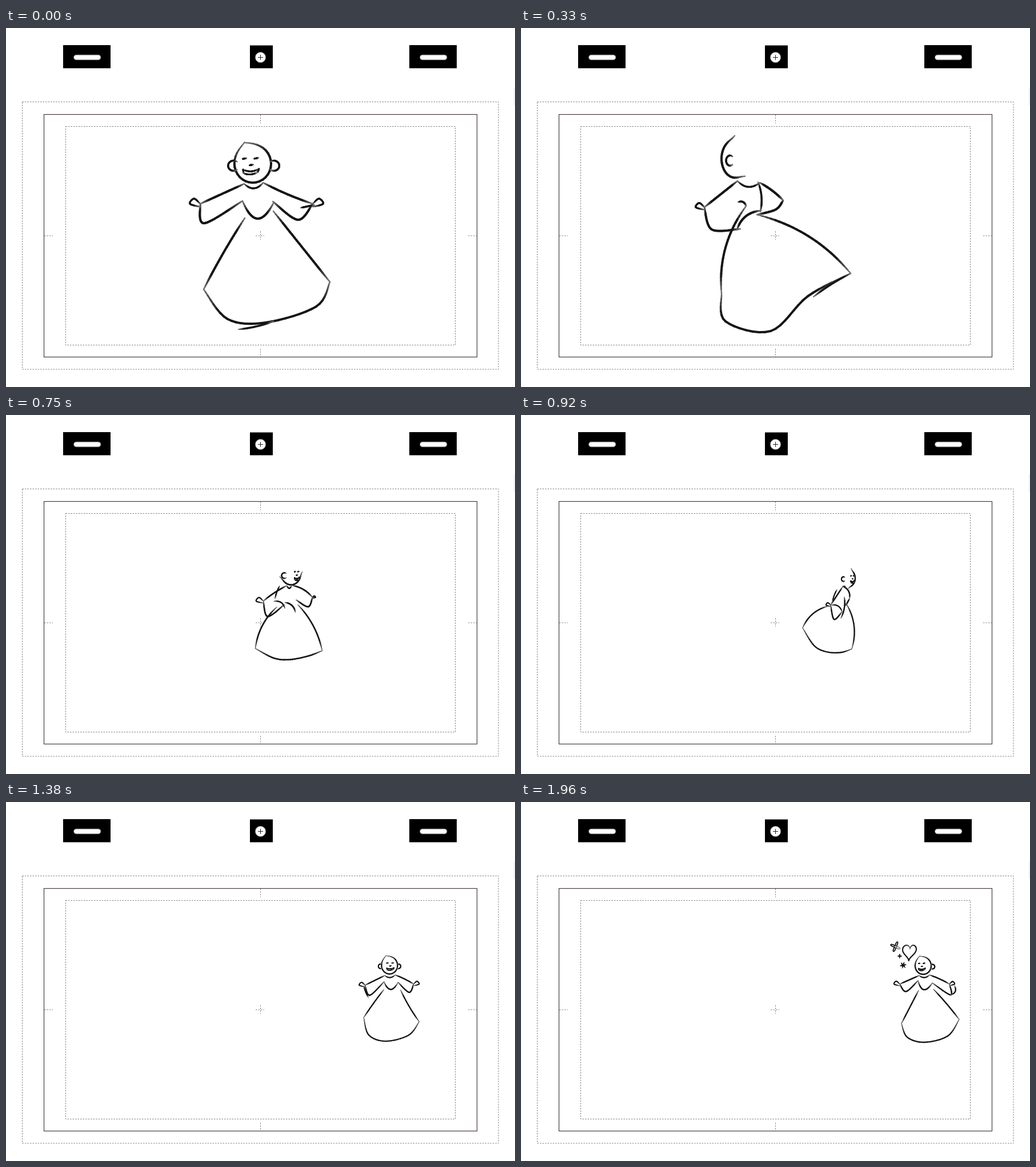
An HTML page with a canvas that plays this animation: 891x629 px, repeating every 2120 ms.

```html
<!DOCTYPE html>
<html lang="en">
<head>
<meta charset="utf-8">
<title>Twirl</title>
<style>
html, body { margin: 0; width: 100%; height: 100%; overflow: hidden; background: #fff; }
canvas { display: block; width: 891px; height: 629px; }
</style>
</head>
<body>
<canvas id="stage" width="891" height="629"></canvas>
<script>
const ctx = document.getElementById('stage').getContext('2d');
const LOOP = 2120, BEAT = 1000 / 12, RESTART = 1460, LAST = 1960;
const TAU = Math.PI * 2;

// One half of the body: joints, arm and skirt bend, hand length
const half = (shoulder, wrist, drop, under, hip, arm, skirt, hand) =>
  ({ shoulder, wrist, drop, under, hip, arm, skirt, hand });

// head: centre and radii; arc: visible outline in degrees; bust and lines: ends and bend
const POSES = [
  {
    t: 0, w: 4, head: [432, 238, 32, 33], arc: [-112, -472],
    left: half([417, 273], [340, 308], [347, 342], [414, 303], [418, 333], 0, 2, 18),
    right: half([450, 271], [537, 308], [511, 336], [467, 304], [468, 321], 2, 0, 18),
    bust: [414, 303, 469, 305, 30],
    hem: [[346, 458], [388, 510], [455, 516], [543, 488], [567, 445]],
    look: { ears: [1.15, -1.05], face: -0.12, lines: [[516, 315, 540, 310, 0], [407, 528, 468, 514, 2]] }
  },
  {
    t: 330, w: 4, head: [374, 229, 23, 33], arc: [-90, -310],
    left: half([379, 268], [321, 314], [334, 353], [384, 352], [394, 312], 0, 15, 15),
    right: half([418, 271], [459, 302], [446, 318], [414, 327], [413, 327], -2, -16, 0),
    bust: [378, 354, 420, 320, -9],
    hem: [[351, 465], [358, 514], [437, 531], [502, 470], [577, 430]],
    look: { ears: [-0.35], face: null, lines: [[415, 270, 419, 322, -4], [577, 430, 512, 471, 2], [380, 305, 394, 312, -4]] }
  },
  {
    t: 580, w: 2.8, head: [425, 273, 21, 21], arc: [-110, -315],
    left: half([420, 297], [359, 319], [368, 348], [413, 319], [411, 338], 3, 8, 17),
    right: half([437, 297], [498, 317], [488, 341], [448, 315], [453, 335], -3, -4, 10),
    bust: [411, 338, 453, 335, -6],
    hem: [[380, 445], [425, 448], [460, 442], [500, 428], [528, 416]],
    look: { ears: [1.05], face: null, lines: [[378, 445, 529, 417, -31], [413, 318, 414, 338, 3], [448, 315, 443, 336, -3], [350, 325, 366, 348, 0]] }
  },
  {
    t: 920, w: 2.3, head: [573, 286, 12, 15], arc: [-270, -430],
    left: half([563, 301], [542, 333], [548, 358], [562, 345], [537, 335], 0, 7, 8),
    right: half([563, 300], [575, 322], [570, 331], [568, 333], [569, 330], -5, -9, 0),
    bust: [566, 319, 560, 356, -3],
    hem: [[493, 373], [513, 404], [535, 415], [560, 416], [579, 410]],
    look: { ears: [-0.7], face: 0.6, lines: [[562, 345, 543, 333, 5], [553, 306, 545, 328, 1]] }
  },
  {
    t: 1170, w: 2.2, head: [654, 286, 14, 15], arc: [-112, -472],
    left: half([645, 304], [610, 322], [617, 342], [644, 316], [643, 328], 0, 1, 10),
    right: half([663, 303], [694, 319], [681, 331], [668, 315], [674, 330], -1, 3, 10),
    bust: [644, 316, 668, 316, 12],
    hem: [[605, 372], [613, 406], [642, 418], [682, 408], [700, 387]],
    look: { ears: [1.1, -1.1], face: 0.08, lines: [[609, 322, 617, 342, 1]] }
  },
  {
    t: 1630, w: 2.3, head: [704, 287, 14, 15], arc: [-112, -472],
    left: half([697, 304], [663, 319], [674, 332], [695, 313], [696, 330], 0, 0, 10),
    right: half([715, 303], [750, 319], [752, 338], [720, 317], [722, 328], -1, -1, 9),
    bust: [695, 313, 720, 317, 14],
    hem: [[666, 388], [676, 412], [706, 421], [747, 410], [767, 381]],
    look: { ears: [1.15], face: -0.18, lines: [[759, 322, 752, 338, -5]] }
  }
];

const lerp = (a, b, k) => a + (b - a) * k;

// Blends two poses; looks switch halfway
function tween(a, b, k) {
  if (typeof a === 'number') return lerp(a, b, k);
  if (Array.isArray(a)) return a.map((v, i) => tween(v, b[i], k));
  const out = {};
  for (const key in a) out[key] = key === 'look' ? (k < 0.5 ? a : b).look : tween(a[key], b[key], k);
  return out;
}

const plot = (n, f) => Array.from({ length: n + 1 }, (_, i) => f(i / n));

// Smooth curve through points
function spline(pts) {
  const last = pts.length - 1, at = i => pts[Math.max(0, Math.min(last, i))];
  return plot(32, u => {
    const i = Math.min(last - 1, Math.floor(u * last)), f = u * last - i;
    const [p, q, r, s] = [-1, 0, 1, 2].map(j => at(i + j));
    return [0, 1].map(d => q[d] + f / 2 * (r[d] - p[d] + f * (2 * p[d] - 5 * q[d] + 4 * r[d] - s[d]
      + f * (3 * (q[d] - r[d]) + s[d] - p[d]))));
  });
}

// Line from a to b bent sideways by s at its middle
function bow([ax, ay], [bx, by], s) {
  const dx = bx - ax, dy = by - ay, len = Math.hypot(dx, dy) || 1;
  return plot(24, u => {
    const h = 4 * s * u * (1 - u) / len;
    return [ax + dx * u - dy * h, ay + dy * u + dx * h];
  });
}

const oval = (x, y, rx, ry, from, to) => plot(32, u => {
  const a = lerp(from, to, u) * Math.PI / 180;
  return [x + rx * Math.cos(a), y + ry * Math.sin(a)];
});

// Brush line, thinner and lighter towards both ends
function brush(pts, w) {
  ctx.lineCap = 'round';
  const n = pts.length - 1;
  for (let i = 0; i < n; i++) {
    const press = Math.min(1, 0.15 + 1.5 * Math.sin(Math.PI * (i + 0.5) / n));
    const g = Math.round(lerp(140, 22, press));
    ctx.strokeStyle = `rgb(${g},${g},${g})`;
    ctx.lineWidth = w * lerp(0.5, 1, press);
    ctx.beginPath();
    ctx.moveTo(...pts[i]);
    ctx.lineTo(...pts[i + 1]);
    ctx.stroke();
  }
}

function drawHead({ head: [x, y, rx, ry], arc, look, w }) {
  // The outline flares into a tuft of hair where it opens
  const tuft = u => 1 + 0.22 * (Math.exp(-u * 18) + Math.exp((u - 1) * 18));
  brush(oval(x, y, rx, ry, ...arc).map(([px, py], i) => {
    const k = tuft(i / 32);
    return [x + (px - x) * k, y + (py - y) * k];
  }), w);
  for (const e of look.ears) {
    const out = Math.sign(e) * 0.3 * rx;
    brush(oval(x + e * rx, y + 0.1 * ry, out, 0.27 * ry, -130, 130), w * 0.85);
  }
  if (look.face === null) return;
  const cx = x + look.face * rx, at = (u, v) => [cx + u * rx, y + v * ry];
  const squeeze = 1 - Math.abs(look.face) * 0.8;
  const mark = (u1, v1, u2, v2, bend) =>
    brush(bow(at(u1 * squeeze, v1), at(u2 * squeeze, v2), bend * ry), w * 0.75);
  mark(-0.5, -0.26, -0.24, -0.3, 0);
  mark(0.2, -0.27, 0.48, -0.32, 0);
  mark(-0.08, 0.08, 0.16, 0.04, 0);
  mark(-0.46, 0.3, 0.5, 0.26, 0.12);
  mark(-0.44, 0.5, 0.4, 0.46, 0.08);
  mark(-0.46, 0.28, -0.42, 0.5, 0);
  mark(0.52, 0.24, 0.42, 0.46, 0);
}

function drawHalf(h, side, end, w) {
  const [x, y] = h.wrist, reach = side * h.hand;
  brush(bow(h.shoulder, h.wrist, h.arm), w);
  brush(spline([h.wrist, h.drop, h.under]), w);
  brush(bow(h.hip, end, h.skirt), w);
  if (h.hand > 2) {
    brush(spline([h.wrist, [x + reach * 0.6, y - h.hand * 0.5], [x + reach, y], [x, y + h.hand * 0.3]]), w * 0.8);
  }
}

function drawFigure(t) {
  const i = Math.max(0, POSES.findLastIndex((p, j) => p.t <= t && j < POSES.length - 1));
  const a = POSES[i], b = POSES[i + 1];
  const k = Math.min(1, (t - a.t) / (b.t - a.t));
  const pose = tween(a, b, k), near = k < 0.5 ? a : b;
  const { left, right, bust, hem, look, w } = pose;
  drawHead(pose);
  drawHalf(left, -1, hem[0], w);
  drawHalf(right, 1, hem[4], w);
  brush(bow(left.shoulder, right.shoulder, pose.head[3] * 0.27), w * 0.8);
  brush(bow(bust.slice(0, 2), bust.slice(2, 4), bust[4]), w);
  brush(spline(hem), w);
  const dx = pose.head[0] - near.head[0], dy = pose.head[1] - near.head[1];
  for (const [x1, y1, x2, y2, s] of look.lines) {
    brush(bow([x1 + dx, y1 + dy], [x2 + dx, y2 + dy], s), w * 0.85);
  }
}

function drawLove(size, tilt) {
  ctx.save();
  ctx.translate(671, 265);
  ctx.rotate(tilt);
  ctx.scale(size, size);
  brush(plot(40, u => {
    const a = u * TAU;
    return [9 + 12 * Math.sin(a) ** 3 + 1.2 * Math.cos(a),
      -3 - 0.93 * (13 * Math.cos(a) - 5 * Math.cos(2 * a) - 2 * Math.cos(3 * a) - Math.cos(4 * a))];
  }), 2);
  brush(plot(48, u => {
    const a = u * TAU, r = 2 + 7 * Math.abs(Math.cos(2 * a)) ** 4;
    return [-15.5 + r * Math.cos(a + 0.4), -11.5 + r * Math.sin(a + 0.4)];
  }), 1.7);
  const cross = (x, y, r, arms, turn) => {
    for (let i = 0; i < arms; i++) {
      const a = turn + i * Math.PI / arms, c = r * Math.cos(a), s = r * Math.sin(a);
      brush(bow([x - c, y - s], [x + c, y + s], 0), 1.7);
    }
  };
  cross(-8, 5, 3.5, 2, 0);
  cross(-2, 21, 5.5, 3, -0.2);
  ctx.restore();
}

function line(x1, y1, x2, y2) {
  ctx.beginPath();
  ctx.moveTo(x1, y1);
  ctx.lineTo(x2, y2);
  ctx.stroke();
}

function peg(x) {
  ctx.fillStyle = '#000';
  ctx.fillRect(x, 30, 83, 40.5);
  ctx.fillStyle = '#fff';
  ctx.strokeStyle = '#555';
  ctx.beginPath();
  ctx.roundRect(x + 18.5, 47, 47.5, 9, 4.5);
  ctx.fill();
  ctx.stroke();
}

function drawSheet() {
  ctx.fillStyle = '#fff';
  ctx.fillRect(0, 0, 891, 629);
  ctx.lineCap = 'butt';
  ctx.lineWidth = 1;
  peg(100);
  peg(706);
  ctx.fillStyle = '#000';
  ctx.fillRect(427, 30.5, 40, 40);
  ctx.fillStyle = '#fff';
  ctx.beginPath();
  ctx.arc(445.5, 51.5, 9.3, 0, TAU);
  ctx.fill();
  ctx.stroke();
  ctx.strokeStyle = '#222';
  line(441, 51.5, 450, 51.5);
  line(445.5, 47, 445.5, 56);

  ctx.strokeStyle = '#808080';
  ctx.setLineDash([2.5, 2]);
  ctx.strokeRect(28.5, 129.5, 833.5, 468.5);
  ctx.strokeRect(104.5, 172.5, 682, 383);
  for (const y of [152, 562]) line(445.5, y, 445.5, y + 15);
  for (const x of [67, 437, 809]) line(x, 364, x + 15, 364);
  line(445.5, 356, 445.5, 371);
  ctx.setLineDash([]);
  ctx.strokeStyle = '#463c43';
  ctx.lineWidth = 1.2;
  ctx.strokeRect(66.5, 151.5, 758, 425);
  ctx.fillStyle = '#e4e4e4';
  ctx.fillRect(889, 104, 1, 31);
}

const start = performance.now();
let shown = -1;

// Drawings change on a beat, which restarts once when the love symbols come in
function tick() {
  const now = Math.min(LAST, (performance.now() - start) % LOOP);
  const base = now < RESTART ? 0 : RESTART;
  const time = n => base + 10 * Math.round(n * BEAT / 10);
  let n = Math.floor((now - base) / BEAT) + 1;
  while (time(n) > now) n--;
  const t = time(n);
  if (t !== shown) {
    shown = t;
    drawSheet();
    drawFigure(t);
    if (base && n) {
      const odd = n % 2;
      drawLove(n === 1 ? 0.6 : odd ? 0.93 : 1, odd * 0.05);
    }
  }
  requestAnimationFrame(tick);
}
tick();
</script>
</body>
</html>
```
